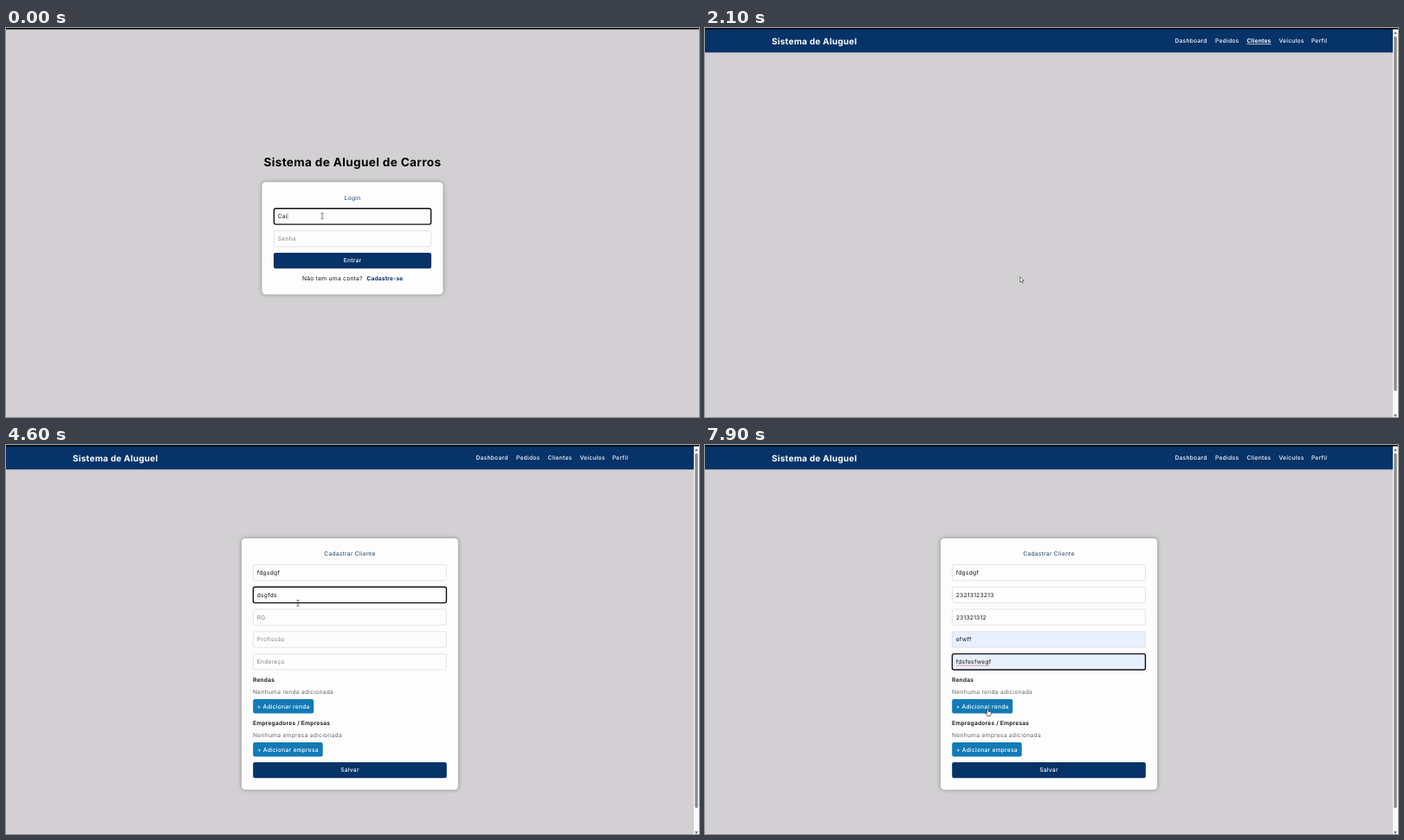
An HTML page that plays this animation: 800 by 450 pixels, repeating every 8000 ms.

```html
<!DOCTYPE html>
<html lang="pt-BR">
<head>
<meta charset="utf-8">
<title>Sistema de Aluguel de Carros</title>
<style>
  html, body { margin: 0; width: 100%; height: 100%; overflow: hidden; background: #d2d0d2; }
  svg { display: block; width: 100vw; height: 100vh; }
  text {
    font-family: Inter, "Noto Sans", sans-serif;
    font-size: 6.67px;
    letter-spacing: .042em;
    text-rendering: geometricPrecision;
    white-space: pre;
  }
  .b { font-weight: 700; letter-spacing: .025em; }
  .sb { font-weight: 600; letter-spacing: .03em; }
  .md { font-weight: 500; letter-spacing: .038em; }
  .mid { text-anchor: middle; }
  .panel { filter: drop-shadow(0 0 2.5px rgba(0, 0, 0, .34)); }
  .card { filter: drop-shadow(0 2px 2.5px rgba(0, 0, 0, .13)); }
  .menu { filter: drop-shadow(0 .8px 1px rgba(0, 0, 0, .25)); }
  .hint { font-family: "Noto Sans", sans-serif; font-size: 5.4px; letter-spacing: 0; }
</style>
</head>
<body>
<svg id="stage" viewBox="0 0 800 450" preserveAspectRatio="none"></svg>
<script>
const LOOP = 8000, STEP = 100;
const NAVY = '#063368', GRAY = '#666', PAPER = '#fdfdfd', USER = 'Caio';
const stage = document.getElementById('stage');

const rect = (x, y, w, h, fill, r = 0, extra = '') =>
  `<rect x="${x}" y="${y}" width="${w}" height="${h}" rx="${r}" fill="${fill}" ${extra}/>`;
const text = (x, y, s, { c = '', size = 6.67, fill = '#111', extra = '' } = {}) =>
  `<text x="${x}" y="${y}" class="${c}" fill="${fill}" style="font-size:${size}px" ${extra}>${s}</text>`;
const path = (d, fill, extra = '') => `<path d="${d}" fill="${fill}" ${extra}/>`;
const at = (x, y, s, k = 1) => `<g transform="translate(${x} ${y}) scale(${k})">${s}</g>`;
const clamp = v => Math.min(1, Math.max(0, v));
const ease = v => v * v * (3 - 2 * v);

// Text typed at a number of characters per step from a start time
const typed = (s, start, t, rate = 1) =>
  t < start ? '' : s.slice(0, ((t - start) / STEP + 1) * rate);

function field(x, y, w, hint, value, { focus = false, caret = false, auto = false } = {}) {
  const border = focus ? 'stroke="#101018" stroke-width="1.4"' : 'stroke="#d9d9dc" stroke-width=".7"';
  const box = rect(x + .4, y + .4, w - .8, 18.4, auto ? '#e8f0fe' : PAPER, 2, border);
  const bar = caret ? '<tspan dx="-.7" font-weight="300">|</tspan>' : '';
  const label = value
    ? text(x + 4.7, y + 12, value + bar)
    : text(x + 4.7, y + 12, hint, { fill: '#858585' }) +
      (caret ? rect(x + 5, y + 5.5, .6, 8, '#222') : '');
  return box + label;
}

const button = (x, y, w, h, label, fill) =>
  rect(x, y, w, h, fill, 2.2) +
  text(x + w / 2, y + h / 2 + 2.3, label, { c: 'md mid', fill: '#fff' });

function loginPage(t) {
  const second = t >= 200;
  const user = t < 100 ? USER.slice(0, 3) : USER;
  const dots = typed('••••', 500, t).length;
  let bullets = '';
  for (let i = 0; i < dots; i++) bullets += `<circle cx="${315.3 + i * 2.8}" cy="243.7" r=".95" fill="#111"/>`;
  return rect(0, 0, 800, 450, '#d2d0d2') +
    text(400, 160, 'Sistema de Aluguel de Carros', { c: 'b mid', size: 13.6, fill: '#050505' }) +
    rect(295.5, 178.3, 209, 130, PAPER, 4.5, 'class="panel"') +
    text(400, 199, 'Login', { c: 'mid', fill: '#234a68' }) +
    field(309, 208.3, 182, 'Nome', user, { focus: !second, caret: !second }) +
    field(309, 234.2, 182, dots ? '' : 'Senha', '', { focus: second, caret: second && !dots }) +
    bullets +
    button(309, 260, 182, 18.3, 'Entrar', NAVY) +
    text(342, 292.3, 'Não tem uma conta?') +
    text(458.5, 292.3, 'Cadastre-se', { c: 'b', fill: NAVY, extra: 'text-anchor="end"' });
}

function chrome(active) {
  const links = [['Dashboard', 561], ['Pedidos', 602.7], ['Clientes', 639.5], ['Veículos', 677], ['Perfil', 709]];
  return rect(0, 1, 794, 27.3, NAVY) +
    text(77, 18.6, 'Sistema de Aluguel', { c: 'b', size: 10, fill: '#fff' }) +
    links.map(([s, x]) => text(x, 17.2, s, {
      c: (s === active ? 'b' : 'md') + ' mid', fill: '#fff',
      extra: s === active ? 'text-decoration="underline"' : ''
    })).join('') +
    rect(794, 1, 6, 449, '#fafafa') +
    rect(795.3, 9.5, 3.4, 410.5, '#8b8b8b', 1.7) +
    path('M795 7 l2 -3 l2 3z M795 447 l2 3 l2 -3z', '#777');
}

const icons = {
  clipboard:
    rect(-8, -9, 16, 19, '#bd7a61', 1.5) + rect(-6, -7, 12, 15, '#f2f0f2') +
    rect(-3.5, -10, 7, 4, '#687080', 1) +
    [-3.5, -.5, 2.5, 5.5].map(y => rect(-4, y, 1.5, 1.2, '#c25a55') + rect(-1.5, y, 6, 1, '#858596')).join(''),
  client:
    path('M-8 10 V5 Q-7 1 -2 0 L0 4 L2 0 Q7 1 8 5 V10z', '#294680') +
    path('M-3 0 L0 5 L3 0 L2 10 H-2z', '#e9e7ec') + path('M-1 2 H1 L1.5 8 L0 10 L-1.5 8z', '#c4393d') +
    '<ellipse cx="0" cy="-4.5" rx="4.7" ry="6" fill="#d99a68"/>' +
    path('M-5 -3 Q-7 -10 0 -10.5 Q5 -10 5 -5 Q1 -8 -3 -6z', '#c9732c') +
    rect(3, -6, 5, 6.5, '#cbdce3', 1),
  car:
    path('M-6 -6 Q-5 -7.5 -3 -7.5 H4 Q6 -7.5 7 -5 L9 -1 Q10 0 10 4 H-10 Q-10 0 -8 -1z', '#d7303d') +
    path('M-4.8 -5.5 H0 V-1.5 H-6.5z M1.2 -5.5 H4.8 L7 -1.5 H1.2z', '#78b4df') +
    rect(-10, 2.5, 20, 2.2, '#7d2439', 1) +
    [-5.5, 5.5].map(x => `<circle cx="${x}" cy="4.3" r="2.8" fill="#28375b"/><circle cx="${x}" cy="4.3" r="1.1" fill="#b9bdd1"/>`).join('') +
    '<circle cx="-8.5" cy="1" r="1" fill="#ffd668"/><circle cx="8.7" cy="1" r="1" fill="#ffd668"/>',
  profile:
    path('M-9.5 10 V7.5 Q-8 4 -3 3 V-1 H3 V3 Q8 4 9.5 7.5 V10z', '#36205f') +
    rect(-5.2, -10, 10.4, 13, '#4a2778', 4.5) +
    path('M-5.2 -3 V-7 Q-4 -11 1 -10 Q6 -9 5.2 -3 Q3 -7 -2 -6z', '#2a164b')
};

function actionCard(x, title, note, icon, lift = 0) {
  const shadow = `style="filter:drop-shadow(0 ${2 + 6 * lift}px ${2.5 + 4.5 * lift}px rgba(0,0,0,${.13 + .1 * lift}))"`;
  return at(x, 314.3, rect(-58.6, -23.3, 117.2, 46.5, PAPER, 4.2, shadow) +
    at(0, -10.6, icons[icon]) +
    text(0, 8.3, title, { c: 'sb mid', size: 7.35, fill: NAVY }) +
    text(0, 17.8, note, { c: 'mid', size: 5.85, fill: GRAY }), 1 + .04 * lift);
}

function dashboardPage(t) {
  const stats = [
    [157, 'Total de Pedidos', 2, 'clipboard'],
    [322.5, 'Clientes Cadastrados', 4, 'client'],
    [488, 'Veículos Cadastrados', 4, 'car']
  ];
  const hand = path('M-3 -1 L-1 -3 L2 -1 L2 -4 Q4 -4 4 0 V3 Q1 5 -2 2z', '#d9a184') +
    path('M-3 3 l-1 -2 M3 -3 l1 1', 'none', 'stroke="#8bb0c8" stroke-width=".7"');
  return `<defs><linearGradient id="fade" x2="0" y2="1">
      <stop stop-color="#d0d0d1"/><stop offset="1" stop-color="#f1f1f1"/></linearGradient></defs>` +
    rect(0, 0, 800, 450, 'url(#fade)') + chrome('Dashboard') +
    rect(291, 63.7, 212.5, 27, PAPER, 4.5, 'class="card"') +
    text(397, 77.3, 'Dashboard', { c: 'b mid', size: 15.2, fill: NAVY }) +
    text(350.7, 87.8, 'Bem-vindo de volta,', { size: 6.45, fill: '#555' }) +
    text(419.5, 87.8, USER, { c: 'b', size: 6.45, fill: NAVY }) + at(438.5, 85.5, hand) +
    stats.map(([x, label, n, icon]) =>
      rect(x, 213.2, 148.7, 22.3, PAPER, 4.5, 'class="card"') +
      at(x + 14.2, 224.2, icons[icon], .95) +
      text(x + 38, 219.6, label, { c: 'md', size: 5.5, fill: GRAY }) +
      text(x + 38, 231.9, n, { c: 'b', size: 10.2, fill: NAVY })).join('') +
    text(397, 267.2, 'Ações Rápidas', { c: 'b mid', size: 12.4, fill: NAVY }) +
    actionCard(195.3, 'Gerenciar Pedidos', 'Visualize e avalie os pedidos de aluguel.', 'clipboard') +
    actionCard(464.2, 'Gerenciar Veículos', 'Cadastre e edite os automóveis.', 'car') +
    actionCard(598.6, 'Editar Perfil', 'Atualize suas informações pessoais.', 'profile') +
    actionCard(329.8, 'Gerenciar Clientes', 'Gerencie e cadastre os clientes.', 'client', ease(clamp((t - 1550) / 250)));
}

const emptyPage = active => rect(0, 0, 800, 450, '#d2d0d2') + chrome(active);

function cpfValue(t) {
  if (t < 4800) return typed('dsgfds', 4100, t);
  if (t < 5100) return 'dsgfds'.slice(0, 4 - (t - 4800) / STEP * 2);
  return typed('23213123213', 5100, t);
}

function formPage(t) {
  const focusTimes = [3100, 4000, 6200, 7100, 7400];
  const focus = focusTimes.filter(s => t >= s).length - 1;
  const values = [
    typed('fdgsdgf', 3200, t), cpfValue(t), typed('231321312', 6500, t, 2),
    t >= 7300 ? 'efwff' : '', t >= 7600 ? 'fdsfesfwegf' : ''
  ];
  const fields = ['Nome', 'CPF', 'RG', 'Profissão', 'Endereço'].map((hint, i) =>
    field(285, 138 + i * 25.8, 223.8, hint, values[i], {
      focus: i === focus, caret: i === focus && !values[i], auto: i > 2 && values[i] !== ''
    })).join('');
  const hintMenu = t >= 6200 && t < 6500
    ? rect(326, 213, 65.5, 18, '#fff', 1, 'class="menu"') +
      '<text x="331" y="224" class="hint" fill="#111">44324243</text>' : '';
  let wave = 'M290 254.6';
  for (let i = 0; i < 19; i++) wave += `l1 ${i % 2 ? -.9 : .9}l1 0`;
  return emptyPage('') +
    rect(272, 108, 250, 290.8, PAPER, 4.5, 'class="panel"') +
    text(397, 128.4, 'Cadastrar Cliente', { c: 'mid', fill: '#1d4068' }) + fields +
    (values[4] ? path(wave, 'none', 'stroke="#df5a60" stroke-width=".6"') : '') +
    text(285, 274.3, 'Rendas', { c: 'sb' }) +
    text(285, 287.7, 'Nenhuma renda adicionada', { fill: GRAY }) +
    button(285.2, 294, 70, 16.5, '+ Adicionar renda', '#127ab6') +
    text(285, 324.3, 'Empregadores / Empresas', { c: 'sb' }) +
    text(285, 337.7, 'Nenhuma empresa adicionada', { fill: GRAY }) +
    button(285.2, 344, 80.5, 16.5, '+ Adicionar empresa', '#127ab6') +
    button(285.2, 367, 223.6, 18.2, 'Salvar', NAVY) + hintMenu;
}

// Pointer stops: time, x, y
const stops = [
  [0, 365, 217.5], [1200, 365, 217.5], [1700, 329, 329], [2000, 329, 329], [2400, 560, 86],
  [2500, 560, 86], [3000, 345, 150], [3800, 345, 150], [4000, 337, 183], [5900, 337, 183],
  [6200, 326, 205], [6900, 326, 205], [7100, 325, 226], [7200, 325, 226], [7400, 325, 252],
  [7600, 325, 252], [7800, 327, 309], [LOOP, 327, 309]
];
const shapes = {
  beam: path('M-1.6 -3.3 H-.5 L0 -2.8 L.5 -3.3 H1.6 M0 -2.8 V2.8 M-1.6 3.3 H-.5 L0 2.8 L.5 3.3 H1.6', 'none',
    'stroke="#333" stroke-width=".7"'),
  arrow: path('M-1.3 -3.2 V3 L.1 1.8 L1.1 3.8 L2.1 3.3 L1.2 1.4 H3z', '#fff', 'stroke="#333" stroke-width=".6"'),
  hand: path('M-1.5 -3.8 Q-.7 -4.8 0 -3.8 V-1 L2.8 -.2 Q3.6 .2 3.4 1.4 L2.5 4.4 H-1.2 L-3.5 1.2 Q-3.2 .2 -1.5 1.3z', '#fff',
    'stroke="#222" stroke-width=".7"')
};

function pointer(t) {
  const i = stops.findIndex(s => s[0] > t);
  const [t0, x0, y0] = stops[i - 1], [t1, x1, y1] = stops[i];
  const k = ease((t - t0) / (t1 - t0));
  const x = x0 + (x1 - x0) * k, y = y0 + (y1 - y0) * k;
  let shape = 'arrow';
  if (t < 1200) shape = 'beam';
  else if (t < 2400) shape = t < 2100 && y > 290 || t >= 2300 ? 'hand' : 'arrow';
  else if (x < 509 && y > 138 && y < 261) shape = 'beam';
  else if (y > 294) shape = 'hand';
  return at(x, y, shapes[shape]);
}

function scene(t) {
  const page = t < 1200 ? loginPage(t)
    : t < 2100 ? dashboardPage(t)
    : t < 2400 ? emptyPage('Clientes')
    : formPage(t);
  return page + rect(0, 0, 800, 1.5, '#000') + pointer(t);
}

let shown = -1;
const began = performance.now();
function tick() {
  const t = Math.floor((performance.now() - began) % LOOP / STEP) * STEP;
  if (t !== shown) stage.innerHTML = scene(shown = t);
  requestAnimationFrame(tick);
}
tick();
</script>
</body>
</html>
```
